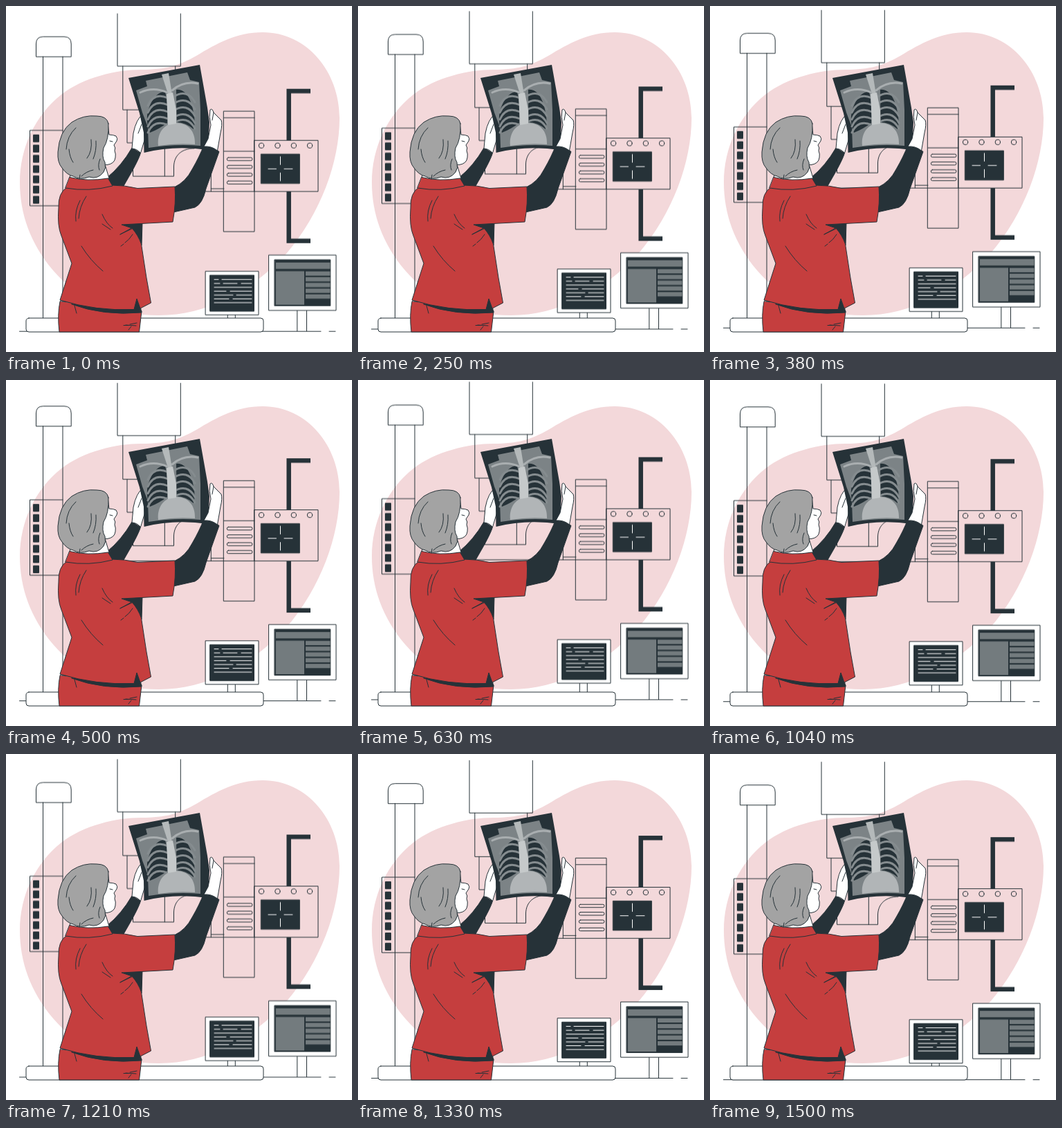
Recreate the animation shown at these times as an HTML page. Size 500x500 px, loop 1540 ms.

```html
<!DOCTYPE html>
<html lang="en">
<head>
<meta charset="utf-8">
<title>X-ray room</title>
<style>
  html, body { margin: 0; width: 100%; height: 100%; overflow: hidden; background: #fff; }
  svg { display: block; width: 100vw; height: 100vh; }
  .line { fill: none; stroke: #263238; stroke-width: 1; stroke-linecap: round; stroke-linejoin: round; }
  .white { fill: #fff; }
  .red { fill: #c53e3e; }
  .hair { fill: #a3a3a3; }
  .dark { fill: #263238; }
  .grey { fill: #737b7e; }
  .bright { stroke: #fff; }
  .rail { stroke-width: 6.5; stroke-linecap: butt; stroke-linejoin: miter; }
  .room { animation: drift 1540ms linear -40ms infinite; }
  @keyframes drift {
    0%, 100% { transform: translateY(.2px); }
    50% { transform: translateY(-9.8px); }
  }
</style>
</head>
<body>
<svg viewBox="0 0 500 500">
  <path fill="#f3d8da" d="M20 255C20 205 42 158 80 128C112 103 160 92 195 92C232 92 250 86 275 72C305 54 333 38 371 38C435 38 482 95 482 162C482 225 455 300 405 358C355 412 290 447 221 447C155 447 105 425 68 382C35 343 20 300 20 255Z"/>

  <g class="room line">
    <path d="M19.500 470.500H455M467 470.500H476"/>

    <!-- left column -->
    <path class="white" d="M43.500 73.300V55Q43.500 44.700 53.500 44.700H84Q94.200 44.700 94.200 55V73.300Z"/>
    <path d="M53.500 73.300V465M82 73.300V465M82 180H34.500V289H82"/>
    <g class="dark" stroke="none">
      <rect id="key" x="39" y="186" width="9" height="11.200" rx="1"/>
      <use href="#key" y="14.800"/><use href="#key" y="29.600"/><use href="#key" y="44.400"/>
      <use href="#key" y="59.200"/><use href="#key" y="74"/><use href="#key" y="88.800"/>
    </g>

    <!-- ceiling tube -->
    <path d="M161 11.500V87.200H252.300V11.500M168.800 87.200V150.300H244.700V87.200M175 150.300V198H200M183.500 198V246.300H242.500V232C243 216 254 206 272 206M229.300 198V246.300"/>

    <!-- detector arm -->
    <path d="M165 268.300H359M296.300 200V268.300M296.300 264.300H315"/>
    <rect x="314.700" y="152.300" width="44.300" height="174"/>
    <path d="M315 161.800H359M315 210.200H359"/>
    <rect id="slot" x="319.300" y="219.300" width="36.700" height="4.400" rx="2.200"/>
    <use href="#slot" y="11.300"/><use href="#slot" y="22.600"/><use href="#slot" y="33.900"/>
    <path class="rail" d="M440 123.200H408.700V194.500M408.700 268.300V339.700H440"/>
    <rect x="359" y="194.500" width="92" height="73.800"/>
    <circle id="knob" cx="369" cy="202" r="3.700"/>
    <use href="#knob" x="23.400"/><use href="#knob" x="46.800"/><use href="#knob" x="70"/>
    <rect class="dark" x="368.700" y="214.300" width="55.600" height="42.500"/>
    <path class="bright" d="M379 235.700H390.500M402 235.700H414M396.500 218V229.500M396.500 241.500V253"/>

    <!-- small monitor -->
    <path d="M320.300 447V460M331.300 447V460"/>
    <rect class="white" x="288.500" y="383.700" width="76.500" height="63"/>
    <rect class="dark" x="295" y="389.300" width="63.500" height="52"/>
    <path class="bright" d="M301 395.500H307M312 395.500H355M301 401.200H309M314 401.200H334M340 401.200H355M301 406.800H355M301 412.400H318M324 412.400H355M301 418H328M333 418H355M301 423.500H322M328 423.500H355M301 429H355"/>

    <!-- large monitor -->
    <path d="M420.800 440V470.500M434.500 440V470.500"/>
    <rect class="white" x="380" y="360.200" width="97" height="80"/>
    <rect class="dark" x="388.300" y="367" width="80.500" height="66.500"/>
    <g class="grey" stroke="none">
      <path d="M390 371H468.500V380.300H390ZM390 383.500H431V432H390Z"/>
      <rect id="row" x="433" y="383.800" width="35.500" height="6.200"/>
      <use href="#row" y="8.300"/><use href="#row" y="16.600"/><use href="#row" y="24.900"/><use href="#row" y="33.200"/>
    </g>
  </g>

  <rect class="line white" x="29" y="451" width="343" height="20" rx="4" style="fill:#fff"/>

  <g class="line">
    <!-- far arm -->
    <path class="dark" d="M146 248Q167 231 182 205L194.500 212.500Q192 221 182 239L170 260L154 262Z"/>
    <path class="white" d="M182 206L184 184Q188 163 199 155Q204 152 204 165L203 184L194.500 212.500Q189 206 182 206Z"/>
    <!-- near arm -->
    <path class="dark" d="M243 262Q260 254 269 236Q280 217 285.500 202Q299 202 308 210.500L289 264Q284 286 273 291L242 298Z"/>
  </g>

  <!-- film -->
  <path class="dark" d="M177 104L280 85L291 147L294 168L292 208Q243 201 199.500 212L199 183L193 155Z"/>
  <path fill="#7c8386" d="M188 122L204 116L202 108L262 96L266 107L279 110L281 150L281 202Q244 199 206 205L205 175L197 154Z"/>
  <g class="dark">
    <path d="M230 124C218 123 207 139 204 158Q203 173 208 183Q221 178 233 169Q235 145 230 124Z"/>
    <path d="M246 121C259 119 268 135 271 154Q274 168 271 178Q259 168 247 168Q246 145 246 121Z"/>
  </g>
  <g fill="none" stroke="#858c8f" stroke-width="3" stroke-linecap="round">
    <path id="ribL" d="M234 133Q214 124 205 144"/>
    <use href="#ribL" y="10"/><use href="#ribL" y="20"/><use href="#ribL" y="30"/><use href="#ribL" y="39"/>
    <path id="ribR" d="M242 131Q262 119 273 139"/>
    <use href="#ribR" y="10"/><use href="#ribR" y="20"/><use href="#ribR" y="30"/><use href="#ribR" y="38"/>
  </g>
  <path fill="#b1b5b7" d="M220 202C218 182 230 169 246 169C263 169 274 181 273 200Q246 198 220 202Z"/>
  <path fill="#b4b9ba" d="M225 99L235 97L240 128L235 130Z"/>
  <path fill="#c5c9ca" d="M232 127L241 125L246 150L246 170L234 172Z"/>
  <path fill="none" stroke="#a9aeb0" stroke-width="3" stroke-linecap="round" d="M194 125Q213 116 233 125M240 122Q256 108 277 112"/>

  <g class="line">
    <!-- near hand -->
    <path class="white" d="M286 203L292 192L296 172Q293 160 295 150Q298 147 300 154L311 165Q313 171 310 183L305.500 209Q297 202 286 203Z"/>
    <path d="M300 154L298 165M191 184L196 171"/>

    <!-- trousers -->
    <path class="red" d="M78 427Q74 446 77 471H192.500L196 441Z"/>
    <path d="M99 433L102 444M170 461.500H177M179 460L189 458M173 461L188 462M181 463L177 468"/>
    <path class="dark" d="M95 431Q140 448 196 443L194 434L189 421L183 433Z"/>

    <!-- tunic -->
    <path class="dark" d="M165 314L197 313L196 346L180 328Z"/>
    <path class="red" d="M88 262Q75 270 76 292Q74 318 80 332L95 372L78 425Q130 441 185 438.500L189 423L194 437L209.500 429L203 393L195.500 344Q191 331 182 321L167 316L241 312Q246 284 244 261L190 263.500Q172 259 153 259Z"/>
    <path class="white" d="M94 238L92 249Q118 257 149 249L143 229Z"/>
    <path class="red" d="M92 247.500Q118 254 147.500 249L154 260Q120 269 86 263Z"/>
    <path d="M107 281Q99 296 101 311M116 275Q106 290 105 307M109 347Q122 368 140 383M139 301Q145 315 154 321M139 315L151 323M165 330L190 318M165 330Q176 324 183 320M166 347L170 344M172 342Q178 338 183 330"/>

    <!-- head -->
    <path class="white" d="M147 169L149 186Q155 186 159 188Q162 192 160 195L156 201Q159 205 157 209Q159 214 158 219Q157 228 146 229.500L138 229L130 190Z"/>
    <path d="M150 195L154 196"/>
    <path class="hair" d="M148 170Q146 159 131 159Q112 157 95 168Q77 181 75 211Q74 226 81 234Q88 244 97 246Q107 252 120 247Q133 251 141 240Q145 234 143 226Q138 218 141 205Q149 193 148 170Z"/>
    <path d="M101 176Q88 188 87 207M91 207Q92 219 97 226M123 193Q125 210 117 220M130 195Q131 209 126 221M109 246Q116 239 126 237M106 250L107 244M136 221Q132 230 135 237"/>
  </g>
</svg>
</body>
</html>
```
